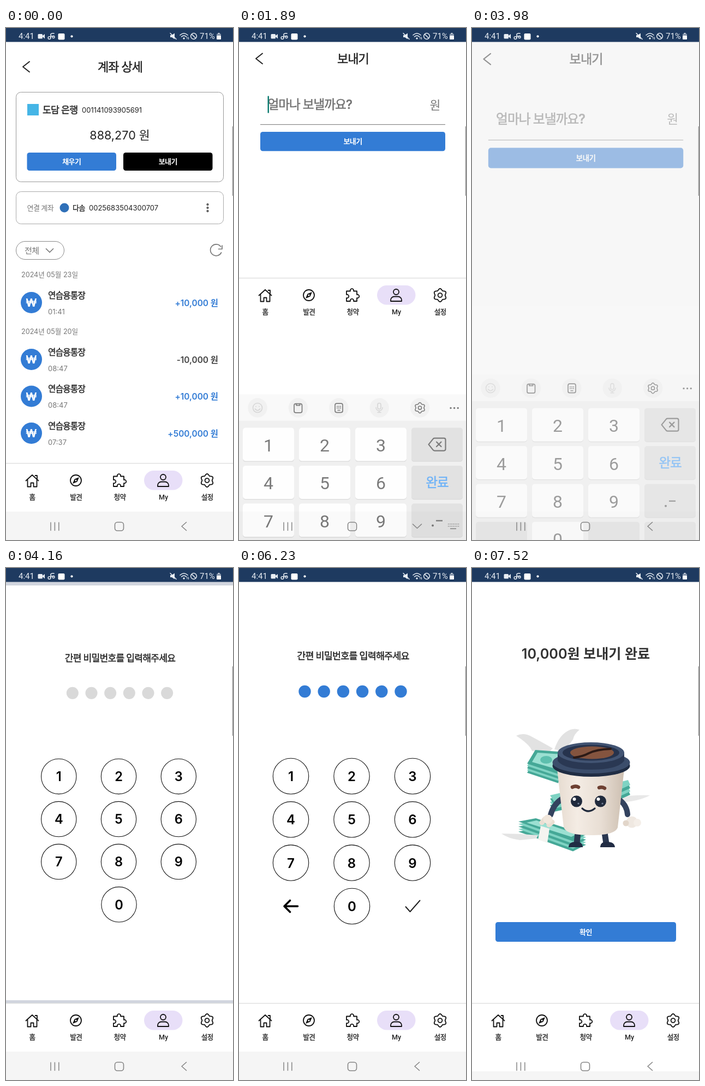
These frames come from a looping animation (416 px wide and 937 px high, 7.72 s). An HTML page:

```html
<!DOCTYPE html>
<html lang="ko">
<head>
<meta charset="utf-8">
<title>Transfer</title>
<style>
html, body { margin: 0; width: 100%; height: 100%; overflow: hidden; background: #fff; }
svg { display: block; width: 100%; height: 100%; }
text { font-family: Inter, "Noto Sans CJK KR", "Noto Sans CJK", sans-serif; white-space: pre; }
.rb { font-family: Roboto, "Noto Sans CJK KR", "Noto Sans CJK", sans-serif; }
.ko { letter-spacing: -.045em; }
.ln { fill: none; stroke-linecap: round; stroke-linejoin: round; }
</style>
</head>
<body>
<svg id="stage" viewBox="0 0 416 937"></svg>
<script>
const LOOP = 7720;
const BLUE = '#337cd5', INK = '#222', GREY = '#777';

const range = (n, f) => Array.from({ length: n }, (_, i) => f(i)).join('');
const clamp = v => Math.min(1, Math.max(0, v));
const within = (t, a, b) => t >= a && t < b;

// ---- drawing helpers ----
function text(x, y, s, size, { fill = INK, w = 400, at = 'start', cls = '', id = '' } = {}) {
  const hangul = /[가-힣]/.test(s);
  const ko = hangul && !/\d/.test(s) ? 'ko' : '';
  // a hairline stands in for the medium weight
  const medium = hangul && w == 500 ? `stroke="${fill}" stroke-width="${size * .024}"` : '';
  return `<text ${id && `id="${id}"`} class="${cls} ${ko}" x="${x}" y="${y}" font-size="${size}" font-weight="${w}" fill="${fill}" text-anchor="${at}" ${medium}>${s}</text>`;
}
const mid = (x, y, s, size, o) => text(x, y, s, size, { at: 'middle', ...o });
const rect = (x, y, w, h, fill, r = 0, more = '') =>
  `<rect x="${x}" y="${y}" width="${w}" height="${h}" rx="${r}" fill="${fill}" ${more}/>`;
const circle = (x, y, r, fill, more = '') => `<circle cx="${x}" cy="${y}" r="${r}" fill="${fill}" ${more}/>`;
const oval = (x, y, rx, ry, fill) => `<ellipse cx="${x}" cy="${y}" rx="${rx}" ry="${ry}" fill="${fill}"/>`;
const line = (d, stroke = '#111', w = 1.8) => `<path class="ln" d="${d}" stroke="${stroke}" stroke-width="${w}"/>`;
const shape = (d, fill) => `<path d="${d}" fill="${fill}"/>`;
const ring = (x, y, r, stroke, w) => circle(x, y, r, 'none', `stroke="${stroke}" stroke-width="${w}"`);
const group = (id, body, more = '') => `<g id="${id}" ${more}>${body}</g>`;
const page = (id, body, h = 771) => group(id, rect(-40, 26, 496, h, '#fff') + body);

function gear(x, y, r, stroke, w) {
  const d = range(60, i => {
    const a = i * Math.PI / 30, q = r * (.9 + .12 * Math.cos(6 * a));
    return (i ? 'L' : 'M') + (x + q * Math.sin(a)).toFixed(2) + ' ' + (y - q * Math.cos(a)).toFixed(2);
  });
  return line(d + 'z', stroke, w) + ring(x, y, r * .33, stroke, w);
}

const header = (title, y) => line(`M43 ${y - 9.5}L31 ${y}l12 9.5`, INK, 2) + mid(209, y + 8, title, 22, { w: 500 });
const button = (x, y, w, h, label, fill, id) =>
  group(id, rect(x, y, w, h, fill, 4.5) + mid(x + w / 2, y + h / 2 + 4.5, label, 13, { fill: '#fff', w: 600 }));

// ---- account page ----
function entry(y, time, amount) {
  return circle(46.5, y, 19.5, BLUE) + mid(46.5, y + 7.5, '₩', 20, { fill: '#fff', w: 700 }) +
    text(77, y - 8, '연습용통장', 15.6, { w: 500 }) +
    text(77, y + 21, time, 13, { fill: GREY }) +
    text(389, y + 6, amount + ' 원', 15.4, { at: 'end', w: 600, fill: amount[0] == '+' ? BLUE : '#444' });
}
const card = (y, h, stroke) => rect(18.5, y, 380, h, '#fff', 9, `stroke="${stroke}"`);
const home = header('계좌 상세', 71) +
  card(117.5, 164, '#999') + rect(39, 139, 21, 21, '#45b5e6') +
  text(67, 156, '도담 은행', 17.3, { w: 500 }) +
  text(139, 155, '001141093905691', 13) +
  mid(208.5, 203.5, '888,270 원', 21.6) +
  button(38.5, 228, 163.5, 33, '채우기', BLUE, 'fill') +
  button(215, 228, 163.5, 33, '보내기', '#000', 'go') +
  card(299.5, 59, '#aaa') +
  text(38.5, 333.5, '연결 계좌', 13, { fill: GREY }) + circle(107, 329, 8.5, '#2f70b8') +
  text(122, 333.5, '다솜', 13, { w: 500 }) + text(152, 333.5, '0025683504300707', 13) +
  range(3, i => ring(369.5, 323 + 6 * i, 1.4, INK, 1.2)) +
  rect(18.5, 390.5, 88, 33, '#fff', 16.5, 'stroke="#888"') +
  text(34, 412.5, '전체', 15.2, { fill: GREY }) + line('M73.5 404l6.5 6.5 6.5-6.5', GREY, 1.7) +
  line('M394.5 411a10.5 10.5 0 1 1-1-11M396 398v6.5h-6.5', GREY, 1.7) +
  text(28, 456, '2024년 05월 23일', 12.6, { fill: GREY }) +
  text(28, 560, '2024년 05월 20일', 12.6, { fill: GREY }) +
  entry(502.5, '01:41', '+10,000') + entry(606.5, '08:47', '-10,000') +
  entry(674, '08:47', '+10,000') + entry(741.5, '07:37', '+500,000');

// ---- amount page ----
const send = group('head', header('보내기', 56)) + group('field',
  text(52.5, 148, '얼마나 보낼까요?', 22.6, { id: 'hint', fill: '#737373', w: 500 }) +
  text(52.5, 148.5, '', 22.4, { id: 'amount' }) +
  rect(0, 124.5, 2.5, 31, '#0f7d72', 0, 'id="caret"') +
  text(349.5, 148.5, '원', 21.5, { fill: GREY }) +
  rect(39, 176, 339, 1.2, '#888') +
  button(39, 190, 339, 35.3, '보내기', BLUE, 'submit'));

// ---- PIN page ----
const pinKey = (x, y, n) => ring(x, y, 32.7, '#111', 1.1) + mid(x, y + 9, n, 24, { fill: '#000', w: 600 });
const pin = mid(209, 167, '간편 비밀번호를 입력해주세요', 17.4, { w: 500 }) +
  group('dots', range(6, i => circle(120.5 + 35.2 * i, 226, 11.2, '#d9d9d9'))) +
  range(9, i => pinKey(95 + 111.5 * (i % 3), 381 + 79.3 * Math.floor(i / 3), i + 1)) + pinKey(207, 619, 0) +
  group('pinTools', line('M107.5 619H83M93.5 608.5L83 619l10.5 10.5', '#000', 3.6) +
    line('M305.5 620l8 9 18-20.5', INK, 2));

// ---- done page ----
const bills = (d, n, dy) => range(n, i => `<g transform="translate(0 ${(n - 1 - i) * dy})">${shape(d, i % 2 ? '#7fd3c3' : '#45a897')}</g>`);
const mascot =
  shape('M81 307q14-7 29 2 15 8 38 21l-8 8-30-3q-4-12-29-28zM151 332q9-28 29-36 8-3 17 0-10 8-12 18-6 9-20 20z', '#e2e2e2') +
  shape('M272 420q20-5 54-4-20 11-54 13z', '#e8e8e8') +
  bills('M101 358l15-25 56 4-14 40z', 5, 4.2) + shape('M110 355l10-17 44 3-9 27z', '#9be0d2') + oval(136, 351, 11, 7, '#5dbfae') +
  bills('M143 416l26-6v14l-18 4z', 4, 6) + bills('M262 394l24-6 4 9-20 9z', 4, 6) +
  bills('M85 464l32-6 92 30-24 12z', 5, 4.6) + shape('M100 466l18-4 74 25-10 5z', '#9be0d2') +
  shape('M126 472l16 5-4 26-17-6z', '#f4f4f0') +
  shape('M54 486q34 0 67 3l-3 6-30 3q-22-3-34-12z', '#e4e4e4') +
  line('M194 484l-2 20M243 484l3 20', '#29364f', 11) +
  shape('M177 511q0-10 14-10 12 0 12 10zM235 511q0-10 12-10 14 0 15 10z', '#212c44') +
  line('M164 423q-15 10-20 29M271 425q13 10 14 26', '#33425e', 10) +
  line('M128 466l6-7 8 9M141 470l6-5', '#eadfd3', 9) + circle(139, 460, 8.5, '#f1e7dc') +
  circle(293, 465, 10.5, '#efe8e1') + circle(303, 466, 7, '#f4eee8') + circle(282, 467, 5.5, '#e2d6ca') +
  shape('M156 368L168 474q4 15 49 15 45 0 50-14l12-107z', 'url(#cup)') +
  oval(218.5, 362, 71, 20, '#202d44') + oval(218.5, 356, 71, 20, '#3b4d6b') +
  shape('M157 337v16q12 16 61 16t61-16v-16z', '#2a3853') +
  oval(218, 338, 61, 19, '#425473') + oval(218, 338, 52, 14.5, '#26334d') + oval(220, 338, 40, 11.5, '#84543f') +
  line('M187 347q16-2 27-8 14-7 40-8', '#2c1a16', 4) +
  line('M184 401q6-3 11 0M233 402q5-2 10 1', '#6d4032', 6.5) +
  range(2, i => circle(191.5 + 44 * i, 427, 10.5, '#202a3c') + circle(187.5 + 44 * i, 423, 3, '#fff') + circle(195 + 44 * i, 431, 1.6, '#75839b')) +
  line('M202 440q11 10 23 0', '#202a3c', 3.2);
const done = mid(208.5, 165.5, '10,000원 보내기 완료', 25.2, { w: 600, fill: '#333' }) + mascot +
  button(43, 648, 331, 36, '확인', BLUE, 'ok');

// ---- tab bar ----
const tabs = rect(0, 796, 416, 89, '#fff') + rect(0, 796, 416, 1.3, '#dcdcdc') + rect(253, 810, 70.5, 35.5, '#e8dff8', 17.7) +
  line('M36.5 828.5L48 818l11.5 10.5M39.5 827v12.5h6v-7h5v7h6V827M53.5 819h3.5v6') +
  ring(128, 828, 10, '#111', 1.8) + shape('M134 822l-3.5 8.5L122 834l3.5-8.5z', '#111') + circle(128, 828, 1.5, '#fff') +
  line('M197 820.5h7a3.2 3.2 0 1 1 6 0h6v6.5a3.2 3.2 0 1 1 0 6v6h-6a3.2 3.2 0 1 0-6 0h-7v-6a3.2 3.2 0 1 0 0-6z') +
  ring(288, 822, 5, '#111', 1.8) + line('M278 839v-2a6.5 6.5 0 0 1 6.5-6.5h7a6.5 6.5 0 0 1 6.5 6.5v2z') +
  gear(368.5, 828, 11.8, '#111', 1.8) +
  ['홈', '발견', '청약', 'My', '설정'].map((s, i) =>
    mid(48 + 80.2 * i, 863, s, 12.6, { w: 500, cls: s == 'My' ? 'rb' : '' })).join('');

// ---- soft keyboard ----
const keyX = c => 7 + 103 * c, keyY = r => 603 + 69.4 * r;
function key(c, r, label, dark, id = '') {
  const x = keyX(c), y = keyY(r);
  return rect(x, y + 1.3, 94, 61, '#c3c3c3', 5) + rect(x, y, 94, 61, dark ? '#cfcfcf' : '#fefefe', 5, id && `id="${id}"`) +
    (label === '' ? '' : mid(x + 47, y + 43.5, label, 32, { cls: 'rb' }));
}
const keyboard = rect(0, 542, 416, 48.5, '#f5f5f5') + rect(0, 590, 416, 347, '#e6e6e6') +
  range(5, i => circle(34 + 74.4 * i, 566.5, 17.7, '#e9e9e9')) +
  ring(34, 566.5, 8.5, '#bbb', 1.6) + line('M29.5 568.5q4.5 5.5 9 0M31 564v.1M37 564v.1', '#bbb') +
  rect(101, 559, 14.5, 16.5, 'none', 3, 'stroke="#222" stroke-width="1.7"') + line('M105 559v3h6.5v-3', INK, 1.7) +
  rect(176, 558.5, 14, 16.5, 'none', 3, 'stroke="#222" stroke-width="1.7"') +
  range(6, i => circle(180 + 3 * (i % 3), 564 + 3 * Math.floor(i / 3), 1, INK)) + line('M181 571h4', INK, 1.5) +
  rect(254, 558, 6, 11, 'none', 3, 'stroke="#bbb" stroke-width="1.6"') + line('M251 566a6 6 0 0 0 12 0M257 572v3M254 575h6', '#bbb', 1.5) +
  gear(331.5, 566.5, 9.4, INK, 1.6) + range(3, i => circle(388 + 6.6 * i, 567, 1.7, INK)) +
  range(9, i => key(i % 3, Math.floor(i / 3), i + 1, false, i ? '' : 'key1')) + key(1, 3, 0, false, 'key0') +
  key(0, 3, '', true) + key(2, 3, '', true) + range(4, r => key(3, r, '', true)) +
  line('M347.5 633.5l8.5-10.5q1-1 2.5-1h17q3 0 3 3v17q0 3-3 3h-17q-1.5 0-2.5-1z', INK, 2.2) + line('M362 629l8.5 8.5M370.5 629l-8.5 8.5', INK, 2.2) +
  mid(363, 711.5, '완료', 23.5, { fill: '#0f80f2', w: 500 }) +
  circle(355, 782, 2, INK) + rect(361, 772, 12, 2.2, INK) + mid(362, 854, ',', 30, { cls: 'rb', fill: '#aaa' });

// ---- system bars ----
const pale = '#e9eef4';
const status = rect(0, 0, 416, 25.5, '#1e3a60') +
  text(23, 20, '4:41', 15, { cls: 'rb', fill: pale }) +
  rect(58.5, 11, 8.5, 8.5, pale, 1.5) + shape('M66 15l5-4v8.5z', pale) +
  ring(79.5, 18, 2.4, pale, 1.4) + line('M82 18v-7q3-2 6-1M82 15h6', pale, 1.5) + ring(87, 16.5, 2, pale, 1.3) +
  rect(95.5, 10, 12, 11.5, '#fff', 2) + circle(120.5, 15.3, 2.1, '#fff') +
  shape('M301 13h3l5-3.5v11l-5-3.5h-3z', pale) + line('M301 9.5l11 11', pale, 1.5) +
  line('M319 13q7-6.5 14 0M321.5 16q4.5-4 9 0', pale, 1.6) + circle(326, 19, 1.7, pale) + line('M332 20v-3.5M334.5 17v3.5', pale, 1) +
  ring(344, 15, 5.4, pale, 1.5) + line('M340.5 11.5l7 7', pale, 1.5) +
  text(355, 20, '71%', 15, { cls: 'rb', fill: pale }) +
  rect(388.5, 9, 3, 2, pale) + rect(386, 10.5, 8, 10.5, '#8796ab', 1.3) + rect(386, 14, 8, 7, '#fff', 1.3);
const NAV = '#858585';
const nav = range(3, i => line(`M${82 + 7.4 * i} 905v14.5`, NAV, 1.5)) +
  rect(199.5, 904.5, 16, 15.5, 'none', 4.5, `stroke="${NAV}" stroke-width="1.6"`) +
  group('navBack', line('M330.5 904.5l-8.5 7.5 8.5 7.5', NAV, 1.6)) +
  group('navHide', line('M318.5 908l8 7.5 8-7.5', NAV, 1.6) +
    range(14, i => rect(383 + 3.1 * (i % 7), 907 + 4 * Math.floor(i / 7), 1.5, 1.5, NAV)) + rect(387, 915.5, 11, 1.6, NAV));

document.getElementById('stage').innerHTML =
  `<defs><linearGradient id="cup"><stop offset="0" stop-color="#e6dbd0"/><stop offset=".3" stop-color="#f4ece4"/><stop offset=".65" stop-color="#e8ded4"/><stop offset="1" stop-color="#cdbfb1"/></linearGradient>
  <clipPath id="body"><rect y="25" width="416" height="912"/></clipPath></defs>` +
  rect(0, 0, 416, 937, '#fff', 0, 'id="back"') +
  `<g clip-path="url(#body)">${page('home', home)}${page('send', send, 911)}${page('pin', pin)}${page('done', done)}</g>` +
  group('tabs', tabs) + rect(0, 885, 416, 52, '#f5f5f5', 0, 'id="navBg"') +
  group('keyboard', keyboard) + nav + status + rect(414.7, 180, 1.3, 127, '#999');

// ---- motion ----
const el = Object.fromEntries([...document.querySelectorAll('[id]')].map(e => [e.id, e]));
const PAGES = ['home', 'send', 'pin', 'done'];
const CUTS = [550, 3910, 6510];
const TYPED = [2390, 2590, 2790, 2890, 3090];
const PIN = [4950, 5150, 5340, 5540, 5740, 5940];
const CARET = [52.5, 62.2, 76, 89.8, 103.6, 117.4];
const OPEN = 1788, CLOSE = 3883;

const show = (e, on) => e.style.display = on ? '' : 'none';
const count = (list, t) => list.filter(v => t >= v).length;
const ease = u => 1 - (1 - u) ** 2.3;
const press = (t, at) => 1 - .6 * clamp(1 - Math.abs(t - at - 120) / 130);

function movePages(t) {
  let back = '#fff';
  PAGES.forEach((id, i) => {
    const tin = i ? t - CUTS[i - 1] : 1e4;
    const tout = i < 3 ? t - CUTS[i] : -1;
    const leaving = tout > 0;
    const p = ease(clamp((leaving ? tout : tin) / 400));
    const scale = leaving ? 1 + .15 * p : .85 + .15 * p;
    const alpha = leaving ? 1 - clamp((tout - 10) / 110) : clamp((tin - 80) / 100);
    const cy = leaving && id == 'send' ? 331 : 411;
    el[id].setAttribute('transform', `translate(208 ${cy}) scale(${scale}) translate(-208 ${-cy})`);
    el[id].setAttribute('opacity', alpha);
    show(el[id], alpha > 0);
    if (leaving && tout < 400) back = tout > 130 ? '#d1d5de' : '#f2f2f2';
  });
  el.back.setAttribute('fill', back);
}

function moveKeyboard(t) {
  const u = clamp((t - OPEN) / 330), v = clamp((t - CLOSE) / 230);
  const drop = 395 * (v ? v ** 1.7 : (1 - u) ** 3);
  el.keyboard.setAttribute('transform', `translate(0 ${drop})`);
  el.keyboard.setAttribute('opacity', v ? clamp(1 - 1.35 * v) : clamp(1.9 * u));
  const raised = within(t, OPEN, CLOSE);
  el.head.setAttribute('transform', `translate(0 ${raised ? 0 : 15})`);
  el.field.setAttribute('transform', `translate(0 ${raised ? 0 : 35})`);
  el.tabs.setAttribute('transform', `translate(0 ${raised ? -339 : 0})`);
  show(el.tabs, !within(t, 1985, 4060));
  show(el.caret, raised);
  show(el.navHide, within(t, 1840, 3930));
  show(el.navBack, !within(t, 1840, 3930));
}

function draw(t) {
  movePages(t);
  moveKeyboard(t);

  const n = t < CLOSE ? count(TYPED, t) : 0;
  el.amount.textContent = '10000'.slice(0, n);
  show(el.hint, !n);
  el.caret.setAttribute('x', CARET[n]);
  el.key1.setAttribute('fill', within(t, 2290, 2490) ? '#d6d6d6' : '#fefefe');
  el.key0.setAttribute('fill', within(t, 2490, 2690) || within(t, 2750, 2990) ? '#d6d6d6' : '#fefefe');
  el.go.setAttribute('opacity', press(t, 300));
  el.submit.setAttribute('opacity', press(t, 3680));

  const filled = count(PIN, t);
  [...el.dots.children].forEach((d, i) => d.setAttribute('fill', i < filled ? BLUE : '#d9d9d9'));
  show(el.pinTools, filled);

  el.navBg.setAttribute('y', t >= 6530 ? 921 : 885);
}

function tick() {
  draw(performance.now() % LOOP);
  requestAnimationFrame(tick);
}
tick();
</script>
</body>
</html>
```
